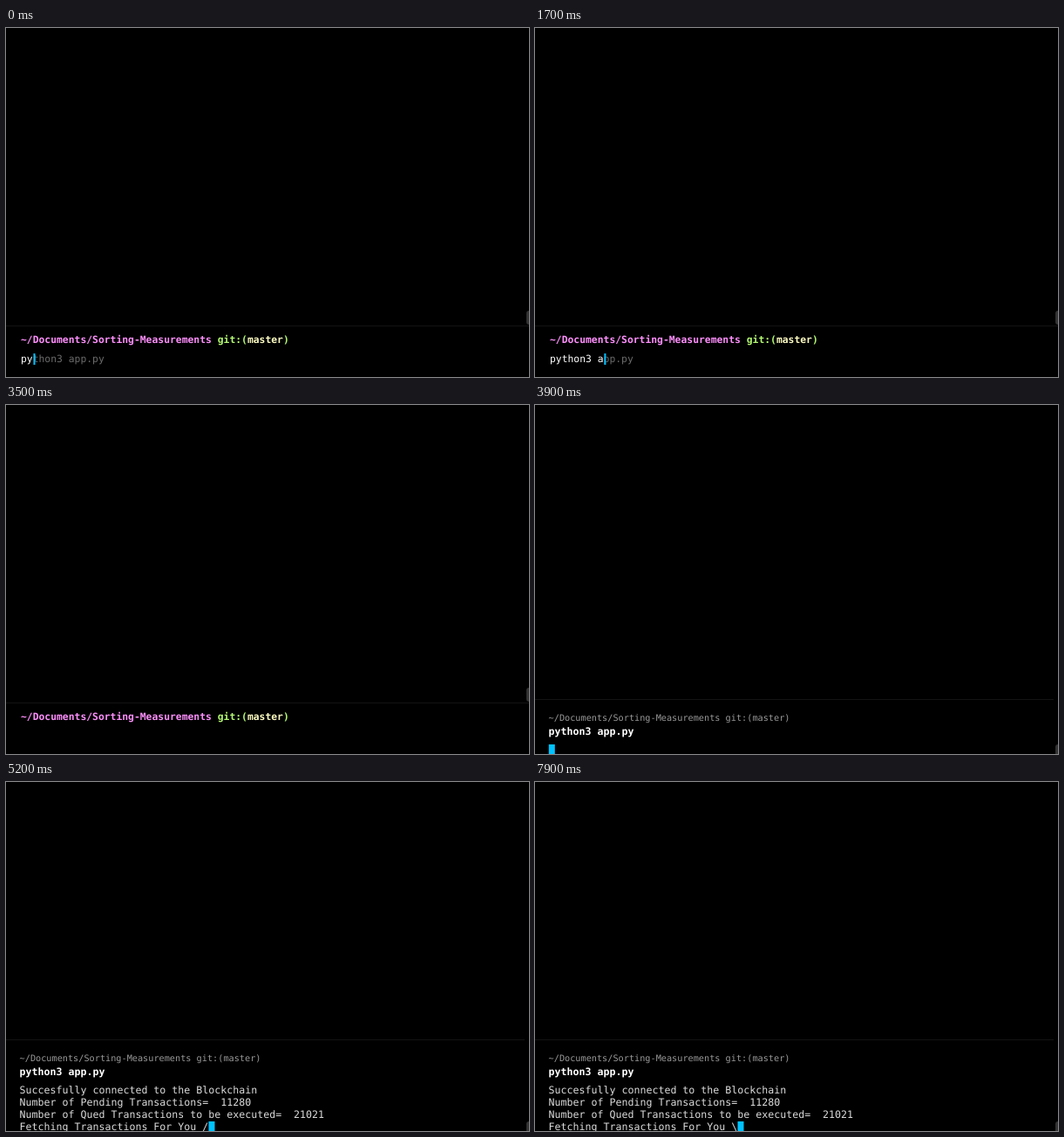
Write an HTML page that moves like this. It is 600 by 400 pixels and loops after 8 s.

```html
<!DOCTYPE html>
<html lang="en">
<head>
<meta charset="utf-8">
<title>Terminal</title>
<style>
  html, body { margin: 0; width: 100%; height: 100%; overflow: hidden; background: #000; }
  svg { display: block; width: 600px; height: 400px; background: #000; }
  text {
    font: 11.61px "DejaVu Sans Mono", monospace;
    white-space: pre;
    text-rendering: geometricPrecision;
    fill: #dcdcdc;
  }
  .input { font-size: 11.37px; fill: #fff; }
  .bold { font-weight: bold; fill: #fff; }
  .past { font-size: 10.23px; fill: #999; }
  .path { fill: #ff8ffd; }
  .git { fill: #b4fa72; }
  .branch { fill: #fefdc2; }
  .ghost { fill: #6b6b6b; }
  .rule { fill: #131313; }
  .cursor { fill: #00c2ff; }
  .thumb { fill: #333; }
</style>
</head>
<body>
<svg viewBox="0 0 600 400">
  <g id="editor">
    <rect class="rule" y="341" width="600" height="1"/>
    <text class="input bold" x="17" y="361"><tspan class="path" id="path"></tspan> <tspan class="git">git:(</tspan><tspan class="branch">master</tspan><tspan class="git">)</tspan></text>
    <g id="entry">
      <text class="input" x="17" y="383"><tspan id="typed"></tspan><tspan class="ghost" id="hint"></tspan></text>
      <rect class="cursor" id="caret" y="373" width="2" height="13"/>
    </g>
  </g>
  <g id="block">
    <rect class="rule" y="323" width="595" height="1"/>
    <text class="past" x="15.6" y="348.2" id="pastPrompt"></text>
    <text class="bold" x="15.6" y="364.2" id="pastCommand"></text>
    <text x="15.6" y="385.2" class="line"></text>
    <text x="15.6" y="399.2" class="line"></text>
    <text x="15.6" y="413.2" class="line"></text>
    <text x="15.6" y="427.2" class="line"></text>
  </g>
  <rect class="cursor" id="blockCursor" y="389" width="7" height="11"/>
  <rect class="thumb" id="thumb" x="597" width="8" height="16" rx="3"/>
</svg>
<script>
const LOOP = 8000;
const LINE_HEIGHT = 14;
const INPUT_ADVANCE = 6.845;
const OUTPUT_ADVANCE = 6.99;

const cwd = '~/Documents/Sorting-Measurements';
const command = 'python3 app.py';
const keyTimes = [100, 300, 500, 900, 1200, 1400, 1700, 1900, 2000, 2300, 2600, 2900];
const submitAt = 3400, runAt = 3600, spinAt = 5000, stallAt = 6600;
const output = [
  { at: 4500, text: 'Succesfully connected to the Blockchain' },
  { at: 4900, text: 'Number of Pending Transactions=  11280' },
  { at: 4900, text: 'Number of Qued Transactions to be executed=  21021' },
];

const $ = id => document.getElementById(id);
const lines = [...document.querySelectorAll('.line')];
const show = (el, on) => { el.style.display = on ? '' : 'none'; };

$('path').textContent = cwd;
$('pastPrompt').textContent = cwd + ' git:(master)';
$('pastCommand').textContent = command;

function spinnerLine(t) {
  if (t < spinAt) return '';
  // The spinner skips one beat when it stalls.
  const step = Math.floor((t - spinAt) / 100) - (t >= stallAt ? 1 : 0);
  return 'Fetching Transactions For You ' + '\\|/-'[step % 4];
}

function drawEditor(t) {
  const count = 2 + keyTimes.filter(at => t >= at).length;
  $('typed').textContent = command.slice(0, count);
  $('hint').textContent = command.slice(count);
  $('caret').setAttribute('x', 17.8 + count * INPUT_ADVANCE);
  show($('entry'), t < submitAt);
}

function drawBlock(t) {
  const printed = output.filter(o => t >= o.at);
  const spinner = spinnerLine(t);
  const texts = [...printed.map(o => o.text), spinner];
  lines.forEach((el, i) => { el.textContent = texts[i] || ''; });
  $('block').setAttribute('transform', `translate(0 ${(1 - printed.length) * LINE_HEIGHT})`);
  $('blockCursor').setAttribute('x', 15.8 + spinner.length * OUTPUT_ADVANCE);
}

function render(t) {
  const running = t >= runAt;
  show($('editor'), !running);
  show($('block'), running);
  show($('blockCursor'), running);
  $('thumb').setAttribute('y', running ? 389 : 324);
  if (running) drawBlock(t);
  else drawEditor(t);
}

const start = performance.now();
function tick() {
  render((performance.now() - start) % LOOP);
  requestAnimationFrame(tick);
}
render(0);
requestAnimationFrame(tick);
</script>
</body>
</html>
```
